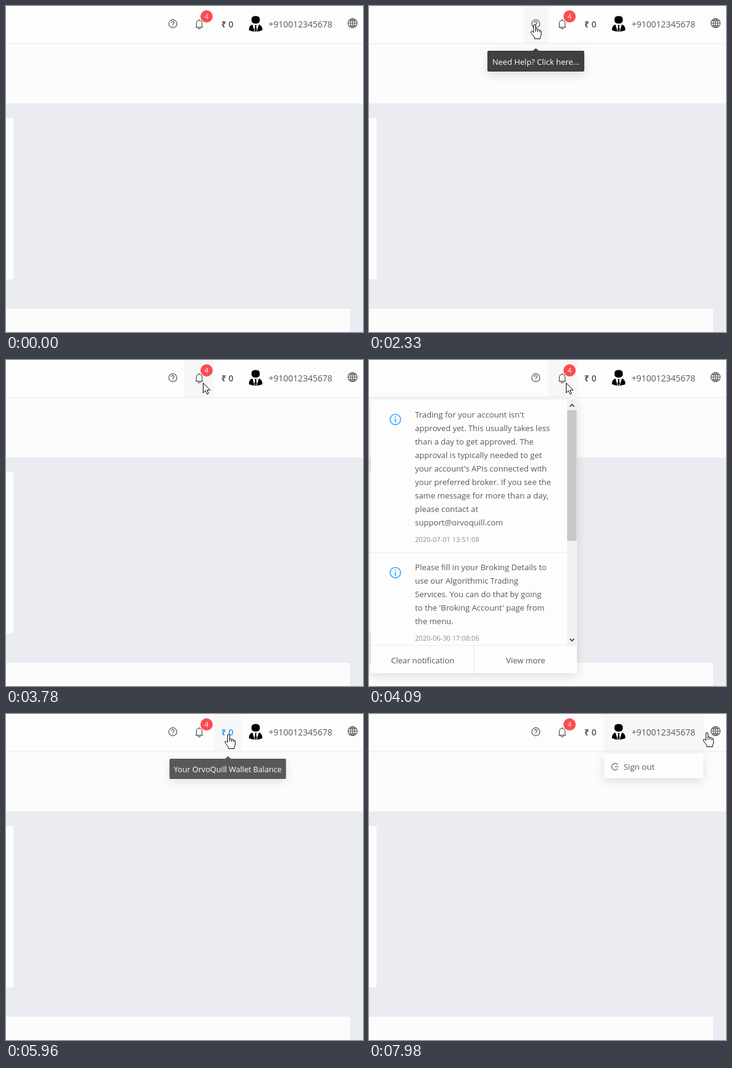
These frames come from a looping animation (582 px wide and 532 px high, 8 s). An HTML page:

```html
<!DOCTYPE html>
<html lang="en">
<head>
<meta charset="utf-8">
<title>Account header</title>
<style>
html, body { margin: 0; height: 100%; overflow: hidden; background: #fdfdfd; }
svg { display: block; font: 13.1px "Open Sans", "Noto Sans", sans-serif; fill: #595959; }
.line { fill: none; stroke: #555; stroke-width: 1.2; }
.pop { filter: drop-shadow(0 5px 8px rgba(0,0,0,.12)); }
.tip { font-size: 13px; fill: #fff; text-anchor: middle; }
.date { font-size: 11.1px; fill: #8e8e8e; }
.rule { stroke: #ebebeb; }
.hover { fill: #f7f7f7; }
.mid { text-anchor: middle; }
.button { font-size: 13px; text-anchor: middle; }
</style>
</head>
<body>
<svg width="582" height="532" viewBox="0 0 582 532">
  <defs>
    <linearGradient id="edge" x2="0" y2="1">
      <stop stop-color="#efefef"/><stop offset="1" stop-color="#fcfcfc"/>
    </linearGradient>
    <g id="info">
      <circle r="8.6" fill="#eef7ff" stroke="#3d9ff2" stroke-width="1.5"/>
      <path d="M0-1V5M0-4.8v1.8" stroke="#3d9ff2" stroke-width="1.6"/>
    </g>
  </defs>

  <rect width="582" height="159" fill="#fcfcfc"/>
  <rect y="159" width="582" height="373" fill="#ebecf1"/>
  <rect y="183" width="12.5" height="263" fill="#fbfcff"/>
  <rect y="494" width="561" height="40" rx="2" fill="#fcfcfd"/>
  <rect width="582" height="60" fill="#fdfdfd"/>
  <rect y="60" width="582" height="4" fill="url(#edge)"/>

  <rect class="hover" id="overHelp" x="252" width="41" height="60"/>
  <rect class="hover" id="overBell" x="291" width="48" height="60"/>
  <rect class="hover" id="overWallet" x="340" width="43" height="60"/>
  <rect class="hover" id="overUser" x="383" width="162" height="60"/>

  <g class="line">
    <circle cx="272" cy="29" r="6.6"/>
    <path d="M269.9 27.6q0-2.2 2.1-2.2t2.1 2q0 1.2-2.1 2.1v1.3M272 31.8v1.4"/>
    <path d="M309 34.6H321M310.4 34.4V28a4.6 4.6 0 0 1 9.2 0v6.4M315 23.4v-1.9M313 35.5a2 1.8 0 0 0 4 0"/>
    <circle cx="565" cy="28" r="7.5"/>
    <ellipse cx="565" cy="28" rx="3.6" ry="7.5"/>
    <path d="M565 20.5v15M557.5 28h15M559 23.8h12M559 32.2h12"/>
  </g>
  <circle cx="327" cy="17" r="10" fill="#fc4c50"/>
  <text class="mid" x="327" y="21" font-size="11" fill="#fff">4</text>
  <text id="wallet" x="351" y="35" font-size="14" font-weight="600">₹ 0</text>

  <g>
    <path d="M400.2 23.5q-1-7.3 6.8-7.3t6.8 7.3q-.6 5.3-6.8 5.3t-6.8-5.3z" fill="#000"/>
    <path d="M396 39.4q0-7 5-8.9h12q5 1.9 5 8.9-5 2.4-11 2.4t-11-2.4z" fill="#000"/>
    <path d="M401.8 30h10.4L409 41h-4z" fill="#fff"/>
    <path d="M405.4 31h3.2l-.8 2.4 1.2 5.4-2 2.6-2-2.6 1.2-5.4z" fill="#000"/>
  </g>
  <text x="428" y="35" font-size="14">+910012345678</text>

  <g id="panel">
    <rect class="pop" x="3" y="65" width="336" height="446" rx="2" fill="#fdfdfd"/>
    <path class="rule" d="M3 314.5H323M3 465.5H339M171.5 465V511"/>
    <rect x="323" y="65" width="15.5" height="400" fill="#f1f1f1"/>
    <rect x="323" y="82" width="15.5" height="213" fill="#c8c8c8"/>
    <path d="M327.5 76l3.5-3.5 3.5 3.5M327.5 455l3.5 3.5 3.5-3.5" fill="none" stroke="#505050" stroke-width="1.8"/>
    <use href="#info" x="43" y="97"/>
    <use href="#info" x="43" y="347"/>
    <g id="notes"></g>
    <text class="date" x="75" y="297">2020-07-01 13:51:08</text>
    <text class="date" x="75" y="458">2020-06-30 17:08:06</text>
    <text class="button" x="87.5" y="495">Clear notification</text>
    <text class="button" x="255.5" y="495">View more</text>
  </g>

  <g id="menu">
    <rect class="pop" x="383" y="65" width="162" height="40" rx="2" fill="#fdfdfd"/>
    <path class="line" d="M405.2 82.8a5.3 5.3 0 1 0 0 6.4M401 86h6"/>
    <text x="415" y="91" font-size="13.4">Sign out</text>
  </g>

  <g id="helpTip">
    <path class="pop" d="M195 73H267l5-4 5 4H349q2 0 2 2V105q0 2-2 2H195q-2 0-2-2V75q0-2 2-2z" fill="#404040"/>
    <text class="tip" x="272" y="96">Need Help? Click here...</text>
  </g>
  <g id="walletTip">
    <path class="pop" d="M266 73H357l5-4 5 4H457q2 0 2 2V105q0 2-2 2H266q-2 0-2-2V75q0-2 2-2z" fill="#404040"/>
    <text class="tip" x="361.5" y="96">Your OrvoQuill Wallet Balance</text>
  </g>

  <g id="cursor" fill="#fff" stroke="#000" stroke-linejoin="round">
    <path id="arrow" d="M.5.5V16.5L4.2 13 6.8 18.8 9.2 17.8 6.7 12.2H11.7z"/>
    <g id="hand">
      <path d="M-1.7 12.5V2Q-1.7.4 0 .4T1.7 2V8Q3.3 6.4 4.9 8.2V9Q6.5 7.4 8 9.3V10.2Q9.8 9 10.7 11V16Q10.6 18.6 9.2 20.6V23.5H-.2V21.2L-5.6 14.2Q-7 11.6-4.6 11.2-3.2 11.2-1.7 13.4z"/>
      <path d="M1.7 8v4M4.9 9v3.4M8 10.2v2.6" fill="none"/>
    </g>
  </g>
</svg>
<script>
const LOOP = 8000;
const $ = id => document.getElementById(id);

const notes = [
  [94, ["Trading for your account isn't", "approved yet. This usually takes less", "than a day to get approved. The",
    "approval is typically needed to get", "your account's APIs connected with", "your preferred broker. If you see the",
    "same message for more than a day,", "please contact at", "support@orvoquill.com"]],
  [343, ["Please fill in your Broking Details to", "use our Algorithmic Trading",
    "Services. You can do that by going", "to the 'Broking Account' page from", "the menu."]]
];
$("notes").innerHTML = notes.map(([y, lines]) =>
  lines.map((s, i) => `<text x="75" y="${y + i * 22}">${s}</text>`).join("")).join("");

// Pointer stops: time, x, y
const stops = [
  [670, -14, 34], [1420, 252, 29], [1560, 270, 30], [2670, 270, 30], [3000, 320, 41], [3180, 321, 38],
  [3440, 321, 38], [3700, 321, 37], [4890, 321, 37], [5100, 322, 37], [5530, 322, 37],
  [5900, 363, 33], [6600, 363, 33], [7150, 480, 36], [7600, 480, 36], [7980, 551, 30]
];

const ramp = (t, a, b) => Math.min(1, Math.max(0, (t - a) / (b - a)));
const smooth = k => k * k * (3 - 2 * k);
const between = (t, a, b, fade = 200) => ramp(t, a, a + fade) * (1 - ramp(t, b, b + fade));
const outQuint = k => 1 - (1 - k) ** 5;
const outCirc = k => Math.sqrt(1 - (1 - k) ** 2);

function pointer(t) {
  const i = stops.findIndex(s => s[0] > t);
  if (i < 0) return stops.at(-1).slice(1);
  if (i === 0) return [-30, 34];
  const [t0, x0, y0] = stops[i - 1], [t1, x1, y1] = stops[i];
  const k = smooth(ramp(t, t0, t1));
  return [x0 + (x1 - x0) * k, y0 + (y1 - y0) * k];
}

function show(id, k) {
  $(id).setAttribute("opacity", k);
}

function zoom(id, k, cx, cy, flat) {
  const s = .8 + .2 * k;
  show(id, k);
  $(id).setAttribute("transform",
    `translate(${cx} ${cy}) scale(${flat ? 1 : s} ${s}) translate(${-cx} ${-cy})`);
}

const tip = (t, a, b) => outCirc(ramp(t, a, a + 100)) * (1 - ramp(t, b, b + 110) ** 3);
const slide = (t, a, b) => outQuint(ramp(t, a, a + 200)) * (1 - ramp(t, b, b + 190) ** 5.7);

function draw(t) {
  show("overHelp", between(t, 1480, 2800, 300));
  show("overBell", between(t, 2800, 5700));
  show("overWallet", between(t, 5700, 6740));
  show("overUser", ramp(t, 6740, 6940));

  const blue = between(t, 5700, 6740);
  const mix = (a, b) => Math.round(a + (b - a) * blue);
  $("wallet").setAttribute("fill", `rgb(${mix(80, 58)},${mix(80, 155)},${mix(80, 235)})`);

  zoom("helpTip", tip(t, 1720, 3060), 272, 69);
  zoom("walletTip", tip(t, 5910, 6840), 361.5, 69);
  zoom("panel", slide(t, 3800, 5110), 171, 65, true);
  zoom("menu", slide(t, 6940, LOOP), 464, 65, true);

  const [x, y] = pointer(t);
  const isArrow = t < 1490 || (t >= 3700 && t < 4900);
  $("cursor").setAttribute("transform", `translate(${x} ${y})`);
  show("arrow", +isArrow);
  show("hand", +!isArrow);
}

const start = performance.now();
function tick() {
  draw((performance.now() - start) % LOOP);
  requestAnimationFrame(tick);
}
tick();
</script>
</body>
</html>
```
